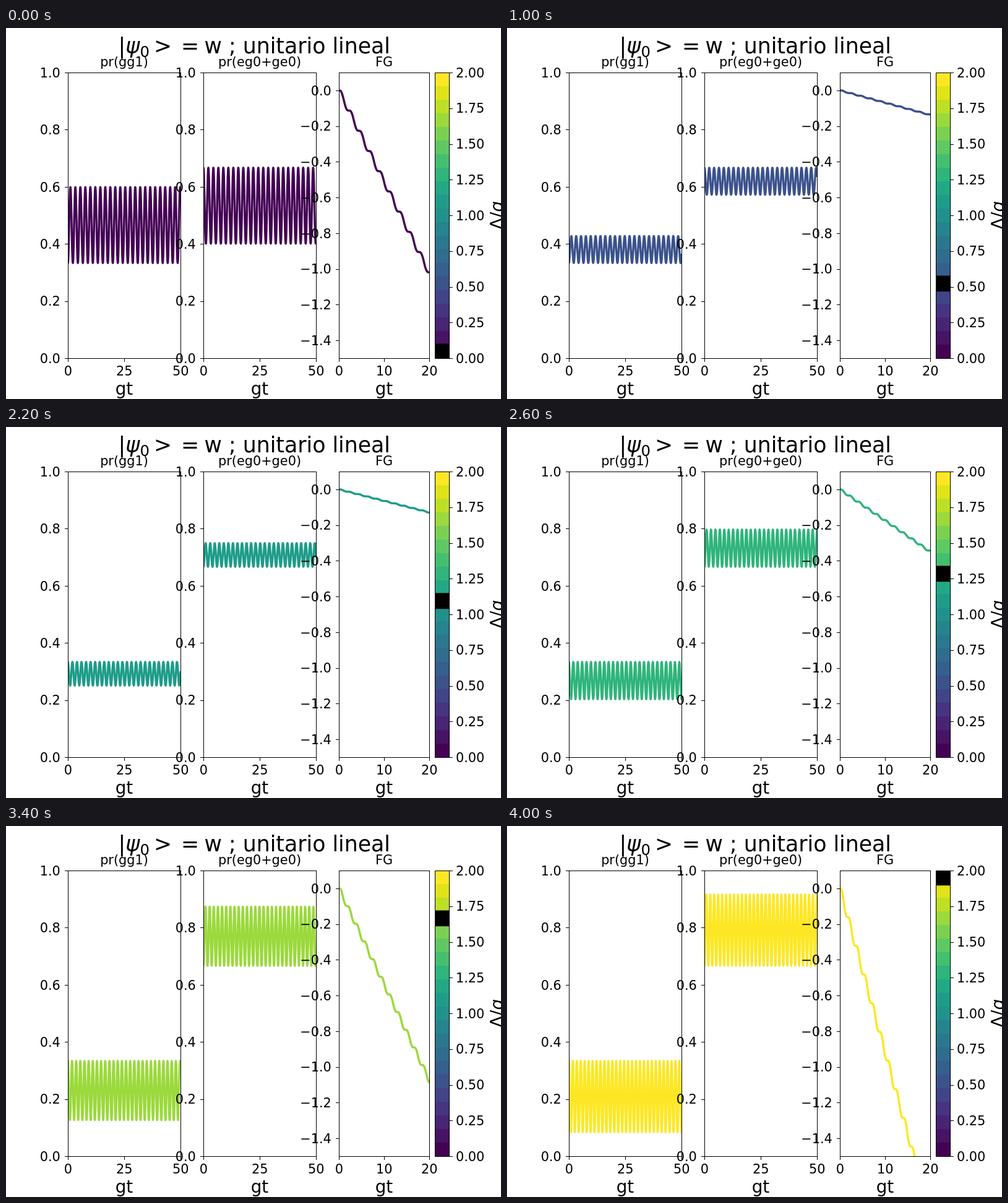
An HTML page with a canvas that plays this animation: 800 by 600 pixels, repeating every 4.2 s.

```html
<!DOCTYPE html>
<html lang="es">
<head>
<meta charset="utf-8">
<title>Unitario lineal</title>
<style>
html, body { margin: 0; width: 100%; height: 100%; overflow: hidden; background: #fff; }
canvas { display: block; }
</style>
</head>
<body>
<canvas id="stage" width="800" height="600"></canvas>
<script>
const ctx = document.getElementById('stage').getContext('2d');
const STEP = 200, COUNT = 21;
const TOP = 72, BOTTOM = 534, HEIGHT = BOTTOM - TOP;
const SMALL = 20.83, MEDIUM = 27.78, LARGE = 34.72;
const LINE_WIDTH = 3.47;
const VIRIDIS = ('440154 471365 482475 463480 414487 3b528b 355f8d 2f6c8e 2a788e 25848e 21918c ' +
  '1e9c89 22a884 2fb47c 44bf70 5ec962 7ad151 9bd93c bddf26 dfe318 fde725')
  .split(' ').map(c => '#' + c);

const range = (n, f) => Array.from({ length: n }, (_, i) => f(i));
const fifths = range(6, i => i / 5);

const panels = [
  { x: 100, w: 182, title: 'pr(gg1)', tMax: 50, lo: 0, hi: 1, ticks: fifths, curve: groundProb },
  { x: 319, w: 182, title: 'pr(eg0+ge0)', tMax: 50, lo: 0, hi: 1, ticks: fifths,
    curve: (m, t) => 1 - groundProb(m, t) },
  { x: 538, w: 146, title: 'FG', tMax: 20, lo: -1.5, hi: 0.1, ticks: range(8, i => -i / 5),
    curve: geometricPhase }
];

// Two-level model: w state precessing about a detuned field
function makeModel(detuning) {
  const d = -0.2 - detuning;
  const omega = Math.sqrt(8 + d * d);
  return {
    omega,
    swing: 8 * (d + 1) / (3 * (8 + d * d)),
    cosAxis: (8 - d) / (3 * omega)
  };
}

function groundProb(m, t) {
  return 1 / 3 + m.swing * (1 - Math.cos(m.omega * t)) / 2;
}

function geometricPhase(m, t) {
  const h = m.omega * t / 2;
  const total = Math.atan(m.cosAxis * Math.tan(h)) + Math.PI * Math.round(h / Math.PI);
  return m.cosAxis * h - total;
}

function text(str, x, y, size, align = 'center', style = '') {
  ctx.font = `${style} ${size}px "DejaVu Sans", sans-serif`;
  ctx.textAlign = align;
  ctx.fillStyle = '#000';
  ctx.fillText(str, x, y);
}

function tick(x, y, dx, dy) {
  ctx.fillStyle = '#000';
  ctx.fillRect(Math.round(x), Math.round(y), dx, dy);
}

function frame(x, w) {
  ctx.strokeStyle = '#000';
  ctx.lineWidth = 1;
  ctx.lineJoin = 'miter';
  ctx.strokeRect(x + 0.5, TOP + 0.5, w, HEIGHT);
}

function drawCurve(p, model, color) {
  ctx.save();
  ctx.beginPath();
  ctx.rect(p.x, TOP, p.w, HEIGHT);
  ctx.clip();
  ctx.beginPath();
  const n = 1600;
  for (let i = 0; i <= n; i++) {
    const v = p.curve(model, p.tMax * i / n);
    ctx.lineTo(p.x + p.w * i / n, BOTTOM - HEIGHT * (v - p.lo) / (p.hi - p.lo));
  }
  ctx.strokeStyle = color;
  ctx.lineWidth = LINE_WIDTH;
  ctx.lineJoin = 'round';
  ctx.lineCap = 'square';
  ctx.stroke();
  ctx.restore();
}

function drawPanel(p, model, color) {
  drawCurve(p, model, color);
  frame(p.x, p.w);
  for (const f of [0, 0.5, 1]) {
    const x = p.x + p.w * f;
    tick(x, BOTTOM + 1, 1, 5);
    text(String(p.tMax * f), x + 0.3, 562, SMALL);
  }
  for (const v of p.ticks) {
    const y = BOTTOM - HEIGHT * (v - p.lo) / (p.hi - p.lo);
    tick(p.x - 5, y, 5, 1);
    const label = (v < 0 ? '\u2212' : '') + Math.abs(v).toFixed(1);
    text(label, p.x - 12.2, Math.round(y + 7.7), SMALL, 'right');
  }
  const mid = p.x + p.w / 2;
  text(p.title, mid, 62, SMALL);
  text('gt', mid, 593, MEDIUM);
}

function drawColorbar(k) {
  const x = 693, w = 23, cell = HEIGHT / COUNT;
  VIRIDIS.forEach((color, i) => {
    ctx.fillStyle = color;
    ctx.fillRect(x, BOTTOM - (i + 1) * cell, w, cell);
  });
  const mid = BOTTOM - (k + 0.5) * cell;
  const y0 = Math.max(TOP, mid - 12.5), y1 = Math.min(BOTTOM, mid + 13.2);
  ctx.fillStyle = '#000';
  ctx.fillRect(x, y0, w, y1 - y0);
  frame(x, w);
  for (let i = 0; i <= 8; i++) {
    const y = BOTTOM - HEIGHT * i / 8;
    tick(x + w + 1, y, 5, 1);
    text((i / 4).toFixed(2), 727, Math.round(y + 7.7), SMALL, 'left');
  }
  ctx.save();
  ctx.translate(802.5, 326);
  ctx.rotate(-Math.PI / 2);
  text('\u0394/', 0, 0, MEDIUM, 'left');
  text('g', 28.4, 0, MEDIUM, 'left', 'italic');
  ctx.restore();
}

function drawTitle() {
  const y = 41;
  text('|', 181.6, y, LARGE, 'left');
  text('\u03c8', 193.3, y, LARGE, 'left', 'italic');
  text('0', 216.5, y + 5.5, LARGE * 0.7, 'left');
  text('>', 239, y, LARGE, 'left');
  text('=', 283, y, LARGE, 'left');
  text('w ; unitario lineal', 320.5, y, LARGE, 'left');
}

function draw(k) {
  ctx.fillStyle = '#fff';
  ctx.fillRect(0, 0, 800, 600);
  const model = makeModel(k / 10);
  panels.forEach(p => drawPanel(p, model, VIRIDIS[k]));
  drawColorbar(k);
  drawTitle();
}

const start = performance.now();
let shown = -1;
function loop() {
  const k = Math.floor((performance.now() - start) / STEP) % COUNT;
  if (k !== shown) draw(shown = k);
  requestAnimationFrame(loop);
}
loop();
</script>
</body>
</html>
```
